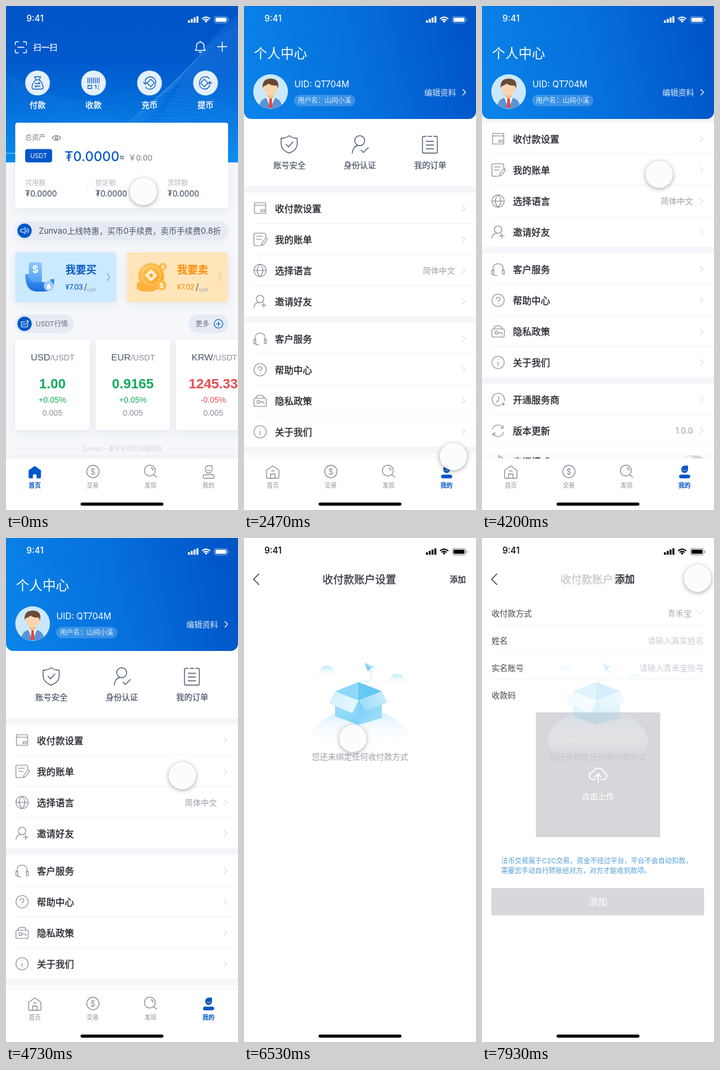
Recreate the animation shown at these times as an HTML page with a canvas. Size 375 by 812 pixels, loop 8000 ms.

```html
<!DOCTYPE html>
<html lang="zh-CN">
<head>
<meta charset="utf-8">
<title>钱包</title>
<style>
html, body { margin: 0; width: 100%; height: 100%; overflow: hidden; background: #fff; }
canvas { display: block; width: 375px; height: 812px; }
</style>
</head>
<body>
<canvas id="stage"></canvas>
<script>
const W = 375, H = 812, LOOP = 8000;
const dpr = window.devicePixelRatio || 1;
const CJK = '"Noto Sans CJK SC", "Noto Sans CJK", "Noto Sans CJK JP", sans-serif';
const UI = 'Inter, ' + CJK;
const ARIAL = '"Liberation Sans", sans-serif';
const BLUE = '#0057c8', SLATE = '#4a5568', GREY = '#8b909a', INK = '#24272e';

function context(canvas) {
  canvas.width = W * dpr;
  canvas.height = H * dpr;
  const c = canvas.getContext('2d');
  c.scale(dpr, dpr);
  c.lineCap = c.lineJoin = 'round';
  return c;
}
const main = context(document.getElementById('stage'));
const spare = context(document.createElement('canvas'));
let g = main;

// ---------- helpers ----------
const ease = p => p * p * (3 - 2 * p);
const phase = (t, from, to) => ease(Math.min(1, Math.max(0, (t - from) / (to - from))));
const mix = (a, b, p) => a + (b - a) * p;

function track(keys, t) {
  let i = 0;
  while (i < keys.length - 2 && t >= keys[i + 1][0]) i++;
  const [a, b] = [keys[i], keys[i + 1]];
  const p = phase(t, a[0], b[0]);
  return a.slice(1).map((v, k) => mix(v, b[k + 1], p));
}

// y is the visual centre of the line; bold adds a thin outline for medium weights
function text(s, x, y, size, color, { align = 'left', font = UI, weight = 400, bold = 0 } = {}) {
  g.font = `${weight} ${size}px ${font}`;
  g.textAlign = align;
  g.fillStyle = color;
  const base = y + size * 0.37;
  g.fillText(s, x, base);
  if (bold) {
    g.strokeStyle = color;
    g.lineWidth = bold;
    g.strokeText(s, x, base);
  }
}

// paths and their gradients are in coordinates local to (x, y)
function fill(d, color, x = 0, y = 0) {
  g.save();
  g.translate(x, y);
  g.fillStyle = color;
  g.fill(new Path2D(d));
  g.restore();
}

function line(d, color, width = 1.2, x = 0, y = 0) {
  g.save();
  g.translate(x, y);
  g.strokeStyle = color;
  g.lineWidth = width;
  g.stroke(new Path2D(d));
  g.restore();
}

function box(x, y, w, h, color, r = 0, shadow) {
  g.save();
  if (shadow) {
    g.shadowColor = shadow;
    g.shadowBlur = 14 * dpr;
    g.shadowOffsetY = 4 * dpr;
  }
  g.fillStyle = color;
  g.beginPath();
  g.roundRect(x, y, w, h, r);
  g.fill();
  g.restore();
}

function disc(x, y, r, color) {
  g.fillStyle = color;
  g.beginPath();
  g.arc(x, y, r, 0, 7);
  g.fill();
}

function ring(x, y, r, color, width = 1.2) {
  g.strokeStyle = color;
  g.lineWidth = width;
  g.beginPath();
  g.arc(x, y, r, 0, 7);
  g.stroke();
}

function grad(x0, y0, x1, y1, ...stops) {
  const k = g.createLinearGradient(x0, y0, x1, y1);
  stops.forEach((c, i) => k.addColorStop(i / (stops.length - 1), c));
  return k;
}

function layer(draw, alpha) {
  spare.clearRect(0, 0, W, H);
  g = spare;
  draw();
  g = main;
  g.save();
  g.globalAlpha = alpha;
  g.drawImage(spare.canvas, 0, 0, W, H);
  g.restore();
}

const chevron = (x, y, color, h = 4.5, w = h / 2, width = 1) =>
  line(`M${-w} ${-h}L${w} 0L${-w} ${h}`, color, width, x, y);

// ---------- shared chrome ----------
function status(color) {
  text('9:41', 33, 20, 14, color, { weight: 500 });
  for (let i = 0; i < 4; i++) {
    const h = 4 + i * 2.2;
    box(294 + i * 4.6, 27 - h, 3.2, h, color, 0.8);
  }
  g.strokeStyle = color;
  g.lineWidth = 2;
  g.lineCap = 'butt';
  for (const r of [5.6, 9]) {
    g.beginPath();
    g.arc(323.5, 27, r, -Math.PI * 0.76, -Math.PI * 0.24);
    g.stroke();
  }
  g.lineCap = 'round';
  fill('M0 0L-2.3-2.6A3.4 3.4 0 0 1 2.3-2.6Z', color, 323.5, 27);
  g.save();
  g.globalAlpha *= 0.45;
  g.strokeStyle = color;
  g.lineWidth = 1;
  g.beginPath();
  g.roundRect(336.8, 17, 21.4, 10.4, 2.8);
  g.stroke();
  box(359.4, 20.4, 1.4, 3.8, color, 0.7);
  g.restore();
  box(338.6, 18.8, 17.8, 6.8, color, 1.4);
}

const indicator = () => box(120.5, 800, 134, 5, '#000', 2.5);

function tabs(active) {
  box(0, 729, W, 83, '#fff', 0, 'rgba(40,60,100,.14)');
  ['首页', '交易', '发现', '我的'].forEach((s, i) => {
    const on = i === active;
    text(s, 46.5 + i * 93.6, 772, 9.7, on ? BLUE : GREY, { align: 'center', bold: on ? 0.4 : 0 });
  });
  const house = 'M0-10L10-3V8Q10 10 8 10H-8Q-10 10-10 8V-3Z';
  if (active === 0) {
    fill(house, BLUE, 46.5, 751);
    box(43.5, 754.5, 6, 6.7, '#fff', [2, 2, 0, 0]);
  } else line(house + 'M-3.5 10V3H3.5V10M-2-2H2', GREY, 1.4, 46.5, 751);
  ring(140.5, 750, 10, GREY, 1.4);
  text('$', 140.5, 750, 13, GREY, { align: 'center' });
  ring(232.5, 748.5, 8.8, GREY, 1.4);
  line('M6.5 6.5L11 10M2-5Q5-4 5-1', GREY, 1.4, 232.5, 749);
  const head = 'M0-10H5.5V-4A5.5 6 0 1 1 0-10Z';
  const body = 'M-5.5 4.5H5.5Q9 4.5 9 7.5Q9 10.5 5.5 10.5H-5.5Q-9 10.5-9 7.5Q-9 4.5-5.5 4.5Z';
  if (active === 3) {
    fill(head + body, BLUE, 327.5, 750.5);
    line('M-2.5-3Q0-1 2.5-3', '#f3b46c', 1.2, 327.5, 750.5);
  } else line(head + body + 'M-2.5-3Q0-1 2.5-3', GREY, 1.3, 327.5, 750.5);
  indicator();
}

// ---------- home ----------
function curves(count, color, y) {
  g.strokeStyle = color;
  for (let i = 0; i < count; i++) {
    g.beginPath();
    for (let x = 0; x <= W; x += 5) g.lineTo(x, y(x, i));
    g.stroke();
  }
}

function waves() {
  g.save();
  g.beginPath();
  g.rect(0, 0, W, 252);
  g.clip();
  // the lighter slope on the right
  fill('M150 252C270 225 260 100 375 15V252Z', grad(270, 60, 320, 250, 'rgba(60,160,255,.16)', 'rgba(60,160,255,.05)'));
  g.lineWidth = 0.6;
  curves(20, 'rgba(130,205,255,.2)', (x, i) =>
    mix(238, 15 + i * 4.5, 1 / (1 + Math.exp(-(x - 275 + i * 3) / 42))));
  curves(20, 'rgba(130,205,255,.16)', (x, i) =>
    110 + i * 4 + x * 0.17 + Math.sin(x / 60 - i * 0.08) * (24 - i * 1.6));
  g.restore();
}

const actionIcons = [
  'M-5-10H5L2.5-5H-2.5ZM-2.5-5C-8-1-12 10-6 10H6C12 10 8-1 2.5-5M-4 1H4L2-1M4 5H-4L-2 7',
  'M-9-8V0M-6-8V0M-3-8V0M0-8V0M3-8V0M6-8V0M9-8V0M-9 4H-3V9H-9ZM2 4H4V9M8 4V5M8 9V8',
  'M2-6L8 0L2 6L-4 0ZM-10-1L-7 2L-4-1M-7 1Q-8-9 1-10Q10-9 10 0Q9 10 0 10Q-4 10-6 7',
  'M-2-6L4 0L-2 6L-8 0ZM10 1L7-2L4 1M7-1Q8 9-1 10Q-10 9-10 0Q-9-10 0-10Q4-10 6-7'
];

function tradeCard(x, tint, color, arrow, title, price, art) {
  box(x, 397, 163.3, 80, tint, 4, 'rgba(40,70,120,.08)');
  art(x + 40, 437);
  text(title, x + 81, 425, 16.8, color, { weight: 700 });
  text(price, x + 81, 453, 11.3, color, { bold: 0.2 });
  text('/', x + 111, 453, 14, SLATE);
  text('USDT', x + 116, 457.5, 5.8, GREY);
  chevron(x + 150.5, 436.5, arrow, 6, 2);
}

function buyArt(x, y) {
  fill('M-18-21Q-18-24-15-24H0Q3-24 3-21V10H-18Z', grad(0, -24, 0, 10, '#8cc8ff', '#4d9bf5'), x, y);
  text('$', x - 7.5, y - 13, 16, '#fff', { align: 'center', weight: 700 });
  fill('M-24-5H-18V0Q-16 8-8 8H14Q17 8 17 3H23V9Q21 23 6 23H-6Q-24 22-24-5Z', grad(0, -5, 0, 23, '#4d9ef7', '#1a6ddd'), x, y);
  disc(x + 14, y + 14, 8, '#9accff');
  fill('M0-4Q7 5 0 5Q-7 5 0-4Z', '#fff', x + 14, y + 14);
}

function sellArt(x, y) {
  disc(x - 1, y - 2, 21, grad(x - 20, y - 20, x + 15, y + 20, '#ffc65c', '#ff9f1c'));
  fill('M-24 9Q-18 6-12 12H8Q14 13 12 18L2 23H-16L-24 19Z', '#ffb13d', x, y);
  ring(x - 1, y - 3, 15, 'rgba(255,255,255,.35)', 1.5);
  fill('M0-10L10 0L0 10L-10 0Z', '#fff3d9', x - 1, y - 3);
  fill('M0-4L4 0L0 4L-4 0Z', '#ffa726', x - 1, y - 3);
  for (const [dx, dy, r] of [[18, -17, 6], [16, 13, 8]]) {
    disc(x + dx, y + dy, r, '#ffb74a');
    text('$', x + dx, y + dy, r * 1.3, '#fff', { align: 'center', weight: 700 });
  }
}

function rateCard(x, coin, value, change, color) {
  const at = { align: 'center', font: ARIAL };
  box(x, 537, 120, 146, '#fff', 4, 'rgba(40,60,100,.08)');
  text(coin, x + 25, 565.7, 15, SLATE, { font: ARIAL });
  const w = g.measureText(coin).width;
  text('/USDT', x + 25 + w, 566, 13, GREY, { font: ARIAL });
  text(value, x + 60, 608.3, 22, color, { ...at, weight: 700 });
  text(change, x + 60, 634.6, 13, color, at);
  text('0.005', x + 60, 655.6, 13, GREY, at);
}

function home() {
  box(0, 0, W, H, '#f5f7fa');
  box(0, 0, W, 252, grad(0, 0, 0, 252, '#0055c6', '#0058cb', '#0370dd', '#068cf2'));
  waves();
  status('#fff');
  line('M-9-4V-7Q-9-9-7-9H-4M4-9H7Q9-9 9-7V-4M9 4V7Q9 9 7 9H4M-4 9H-7Q-9 9-9 7V4M-5 0H5', '#fff', 1.4, 24, 66.5);
  text('扫一扫', 44, 66.5, 13, '#fff', { bold: 0.25 });
  line('M-8 6Q-6 4-6-1Q-6-7 0-7Q6-7 6-1Q6 4 8 6ZM0-9V-7M-2 9H2', '#fff', 1.4, 314, 65.5);
  line('M-7.5 0H7.5M0-7.5V7.5', '#fff', 1.4, 349.5, 65.5);
  ['付款', '收款', '充币', '提币'].forEach((s, i) => {
    const x = 51 + i * 90.5;
    disc(x, 124, 20, '#e4f0fc');
    line(actionIcons[i], '#1a62bd', 1.3, x, 124);
    text(s, x, 159.5, 13, '#fff', { align: 'center', bold: 0.4 });
  });

  box(15, 188, 344, 138, '#fff', 4, 'rgba(40,60,100,.08)');
  text('总资产', 31, 212, 11, '#7b818c');
  line('M-7 0Q0-8 7 0Q0 8-7 0Z', '#5f6672', 1.1, 81.5, 212.5);
  ring(81.5, 212.5, 2, '#5f6672', 1.1);
  box(31, 230.5, 43.5, 21.5, BLUE, 4);
  text('USDT', 52.8, 241.5, 10, '#fff', { align: 'center' });
  text('₮0.0000', 94.5, 242, 21.5, '#0b5cc4', { weight: 500 });
  text('≈', 183, 243, 13, SLATE);
  text('￥0.00', 198, 244, 12.3, '#6d7480');
  [['可用额', 31], ['锁定额', 144.5], ['流转额', 261]].forEach(([s, x], i) => {
    text(s, x, 285, 11, '#b3b7be');
    text('₮0.0000', x, 302, 12.7, SLATE, { bold: 0.2 });
    if (i) box(i === 1 ? 130.5 : 243.5, 283, 1, 21, '#eceef2');
  });

  box(15, 347, 344, 30, '#e5eaf3', 15, 'rgba(40,60,100,.05)');
  disc(30, 362, 11.5, BLUE);
  line('M-6-2H-3L1-5V5L-3 2H-6ZM3-2Q5 0 3 2M5-4Q8 0 5 4', '#fff', 1, 30, 362);
  text('Zunvao上线特惠，买币0手续费，卖币手续费0.8折', 53, 362, 13, SLATE);

  tradeCard(15, '#cbe9ff', '#0b5cc4', '#3f83d8', '我要买', '¥7.03', buyArt);
  tradeCard(195.5, '#ffe5b9', '#ff8c0a', '#ffae4d', '我要卖', '¥7.02', sellArt);

  box(15, 497, 94.5, 30, '#e5eaf3', 15);
  disc(30, 512, 11.5, BLUE);
  line('M-5-3H1M5-1V5H-5V-3M-3 2L-1 0L1 2L5-4M3-5H6V-2', '#fff', 1, 30, 512);
  text('USDT行情', 48, 512, 11, '#69717f');
  box(295, 497, 64, 30, '#e5eaf3', 15);
  text('更多', 306.5, 512, 11, '#69717f');
  ring(343.5, 512, 7, BLUE, 1.1);
  line('M-3.5 0H3.5M0-3.5V3.5', BLUE, 1.1, 343.5, 512);

  rateCard(15, 'USD', '1.00', '+0.05%', '#12ab5c');
  rateCard(145, 'EUR', '0.9165', '+0.05%', '#12ab5c');
  rateCard(275, 'KRW', '1245.33', '-0.05%', '#ea4b4f');
  text('Zunvao--更安全的区块链钱包', 187.5, 713.5, 9.7, '#d3d6dc', { align: 'center' });
  box(15, 713, 99, 0.8, '#e6e9ee');
  box(260, 713, 99, 0.8, '#e6e9ee');
  tabs(0);
}

// ---------- profile ----------
const rowIcons = {
  card: 'M-9-9H9M-9-5H9V8H-9ZM-9-8V-5M9-8V-5M2 2H7V5H1Z',
  bill: 'M9-4V-8Q9-10 7-10H-8Q-10-10-10-8V8Q-10 10-8 10H0M-6-5H4M-6 0H2M10-3L3 6L2 10L6 8L12 0Z',
  globe: 'M-10 0A10 10 0 1 1 10 0A10 10 0 1 1-10 0M-10 0H10M0-10Q-9 0 0 10Q9 0 0-10',
  invite: 'M-6-4A6 6 0 1 1 6-4A6 6 0 1 1-6-4M-10 10Q-9 2-3 2M6 2V10M2 6H10',
  service: 'M-8 2V-1Q-8-9 0-9Q8-9 8-1V2M-10 1H-7V8H-10ZM7 1H10V8H7ZM-8 8Q-7 10-2 10',
  help: 'M-10 0A10 10 0 1 1 10 0A10 10 0 1 1-10 0M-3-2Q-3-5 0-5Q3-5 3-2Q3 0 0 1V2M0 5V5.3',
  privacy: 'M-8-4H8Q10-4 10-2V7Q10 9 8 9H-8Q-10 9-10 7V-2Q-10-4-8-4M-7-4Q-6-9 0-9Q6-9 7-4M-5 2A2.5 2.5 0 1 1 0 2A2.5 2.5 0 1 1-5 2M0 2H6V5',
  about: 'M-10 0A10 10 0 1 1 10 0A10 10 0 1 1-10 0M0-1V5M0-5V-4.7',
  clock: 'M4 9A10 10 0 1 1 10 2M1-5V1L-3 4M5 7H10M8 5L10 7L8 9',
  update: 'M-9-2A9 9 0 0 1 8-4M9 2A9 9 0 0 1-8 4M8-8V-4H4M-8 8V4H-4',
  night: 'M1-10Q13-4 8 6Q1 13-9 6Q4 6 1-10Z'
};

const groups = [
  [326, ['card', '收付款设置'], ['bill', '我的账单'], ['globe', '选择语言', '简体中文'], ['invite', '邀请好友']],
  [536, ['service', '客户服务'], ['help', '帮助中心'], ['privacy', '隐私政策'], ['about', '关于我们']],
  [746, ['clock', '开通服务商'], ['update', '版本更新', '1.0.0'], ['night', '夜间模式']]
];

function avatar() {
  g.save();
  g.beginPath();
  g.arc(43, 138, 28, 0, 7);
  g.clip();
  box(15, 110, 56, 56, '#cbe8fa');
  fill('M-19 30Q-19 13-7 10H7Q19 13 19 30Z', '#5b93d6', 43, 138);
  fill('M-7 9L0 28L7 9Z', '#fff', 43, 138);
  fill('M-2 11H2L3 26H-3Z', '#e0483e', 43, 138);
  box(38, 138, 10, 11, '#eabf96', 4);
  box(32, 118, 22, 26, '#f8d5ae', 11);
  fill('M-13-6Q-14-22 2-21Q15-20 12-5L10-10Q2-9-3-13Q-7-10-11-9Z', '#6a4a36', 43, 138);
  g.restore();
}

function rows(scroll) {
  g.save();
  g.translate(0, -scroll);
  line('M0-14Q5-10 13-10V0Q12 10 0 14Q-12 10-13 0V-10Q-5-10 0-14ZM-5 0L-1 4L6-4', '#4f5c70', 1.4, 73, 223);
  line('M-8-6A8 8 0 1 1 8-6A8 8 0 1 1-8-6M-12 14Q-11 4-4 2M2 9L6 13L14 5', '#4f5c70', 1.4, 187, 223);
  line('M-6-13H-10Q-12-13-12-11V12Q-12 14-10 14H10Q12 14 12 12V-11Q12-13 10-13H6M-3-13H3M-6-5H6M-6 1H6M-6 7H6', '#4f5c70', 1.4, 300.5, 223);
  ['账号安全', '身份认证', '我的订单'].forEach((s, i) =>
    text(s, 73.5 + i * 113.7, 256, 13, '#3f4c60', { align: 'center', bold: 0.2 }));
  for (const [top, ...items] of groups) {
    box(0, top - 36, W, 10.5, '#f4f6f9');
    items.forEach(([icon, label, note], i) => {
      const y = top + i * 50;
      line(rowIcons[icon], '#7d8490', 1.1, 26, y);
      text(label, 50, y, 15, INK, { bold: 0.35 });
      if (note) text(note, 341, y, 13, '#9a9fa8', { align: 'right' });
      if (icon === 'night') {
        box(325, y - 10, 34, 20, '#d9dadd', 10);
        disc(335, y, 9, '#fff');
      } else chevron(355, y, '#c5c9d1');
      if (i < items.length - 1) box(15, y + 24, 360, 0.8, '#eef0f3');
    });
  }
  box(0, 871, W, 120, '#f4f6f9');
  g.restore();
}

function profile(scroll) {
  box(0, 0, W, H, '#fff');
  rows(scroll);
  box(0, 0, W, 182, grad(0, 130, 360, 40, '#0a83e9', '#0670dc', '#0055c7'), [0, 0, 12, 12]);
  status('#fff');
  text('个人中心', 16, 76, 21.5, '#fff');
  avatar();
  text('UID: QT704M', 81.5, 126, 14, '#fff');
  box(81, 143, 99, 18.5, 'rgba(255,255,255,.2)', 9);
  text('用户名：山间小溪', 87, 152.5, 10.8, 'rgba(255,255,255,.85)');
  text('编辑资料', 291.5, 139, 12.8, 'rgba(255,255,255,.88)');
  chevron(356, 139, '#fff', 4.5, 2.2, 1.1);
  tabs(3);
}

// ---------- payment accounts ----------
function cloud(x, y) {
  fill('M-22 9Q-22 1-13 1Q-10-9 0-8Q9-8 11 0Q20 0 22 9Z', grad(0, -8, 0, 9, '#bde9fc', 'rgba(255,255,255,0)'), x, y);
}

function carton() {
  fill('M107 325C110 296 150 275 187 275C225 275 264 296 268 325Q268 350 246 352H129Q107 350 107 325Z',
    grad(0, 275, 0, 352, '#c9eefe', '#f1faff', '#fff', 'rgba(255,255,255,0)'));
  cloud(135, 214);
  cloud(248, 227);
  fill('M147 247L185 232V262Z', '#8fd8f8');
  fill('M185 232L223 247L185 262Z', '#66c8f4');
  fill('M147 247L185 262V301L147 287Z', grad(147, 250, 185, 300, '#a6e1fa', '#7ed2f7'));
  fill('M185 262L223 247V290L185 301Z', grad(185, 260, 223, 290, '#74cdf6', '#a0dffa'));
  fill('M147 247L185 262L175 282L137 266Z', grad(140, 250, 180, 280, '#d0effd', '#e8f8fe'));
  fill('M185 262L223 247L232 265L197 279Z', grad(190, 275, 232, 250, '#9bdcf9', '#cdeefc'));
  g.save();
  g.setLineDash([2, 3]);
  line('M205 214Q209 225 200 232Q190 228 187 233Q194 240 189 254', '#7dcdf3', 1);
  g.restore();
  fill('M195 201L212 208L205 210L200 215Z', '#b4e4fa');
  fill('M195 201L205 210L200 215Z', '#7fcdf4');
}

const back = () => line('M4-8.5L-4.5 0L4 8.5', '#333', 1.4, 20, 66.5);

function emptyBody() {
  text('收付款账户设置', 186.5, 66.5, 17, '#33363c', { align: 'center', bold: 0.3 });
  carton();
  text('您还未绑定任何收付款方式', 187.5, 352, 13, '#9a9ea6', { align: 'center' });
}

function addBody() {
  const right = { align: 'right' };
  ['收付款方式', '姓名', '实名账号', '收款码'].forEach((s, i) => {
    text(s, 15.5, 121 + i * 44, 13, '#1d2026', { bold: 0.2 });
    if (i < 3) box(15, 140 + i * 44, 344, 0.8, '#ebecef');
  });
  text('青禾宝', 339, 121, 13, '#8d929b', right);
  line('M-5-2.5L0 2.5L5-2.5', '#c0c4cb', 1, 352, 120);
  text('请输入真实姓名', 358.5, 165, 13, '#b5bac5', right);
  text('请输入青禾宝账号', 358.5, 209, 13, '#b5bac5', right);
  box(87, 281, 201, 201, '#c8c9ce');
  line('M-5 7H-8Q-14 7-14 1Q-14-5-8-5Q-6-11 1-11Q8-11 9-5Q14-4 14 1Q14 7 8 7H5M0 11V-2M-5 3L0-2L5 3', '#fff', 1.8, 187.5, 382);
  text('点击上传', 187.5, 416, 13, '#fff', { align: 'center', bold: 0.2 });
  text('法币交易属于C2C交易，资金不经过平台，平台不会自动扣款，', 31, 520, 11, '#0d78c8');
  text('需要您手动自行转账给对方，对方才能收到款项。', 31, 536, 11, '#0d78c8');
  box(15, 564, 344, 44, '#c8cace', 2);
  text('添加', 187.5, 586.5, 15, '#fff', { align: 'center' });
}

// the "添加" button travels into the title as p goes from list (0) to form (1)
function accountChrome(p) {
  status('#000');
  back();
  text('添加', mix(345.5, 187.5, p), 66.5, mix(13, 17, p), INK, { align: 'center', bold: 0.35 });
  indicator();
}

function emptyList() {
  box(0, 0, W, H, '#fff');
  emptyBody();
  accountChrome(0);
}

function addForm(p) {
  box(0, 0, W, H, '#fff');
  layer(addBody, p);
  layer(emptyBody, 1 - p);
  accountChrome(p);
}

// ---------- timeline ----------
const pointer = [
  [40, 222, 299], [1000, 348, 754], [2200, 348, 754], [2360, 347, 752], [2530, 335, 716],
  [2850, 296, 539], [2920, 296, 539], [3340, 288, 375], [3480, 288, 375], [3880, 287, 219],
  [3960, 287, 219], [4600, 285, 383], [4850, 285, 383], [5400, 176, 323],
  [7000, 176, 323], [7700, 348.5, 65]
];
const scrolling = [[2920, 0], [3340, 164], [3960, 164], [4600, 0]];

function touch(x, y) {
  g.save();
  g.shadowColor = 'rgba(0,0,0,.36)';
  g.shadowBlur = 7 * dpr;
  g.shadowOffsetY = 1.5 * dpr;
  disc(x, y, 22, 'rgba(255,255,255,.96)');
  g.restore();
}

function render(t) {
  g = main;
  const me = () => profile(track(scrolling, t)[0]);
  const toMe = phase(t, 1790, 2090), toList = phase(t, 5960, 6260), toForm = phase(t, 7800, 8000);
  if (toMe < 1) {
    home();
    if (toMe > 0) layer(me, toMe);
  } else if (toList < 1) {
    me();
    if (toList > 0) layer(emptyList, toList);
  } else if (toForm > 0) addForm(toForm);
  else emptyList();
  touch(...track(pointer, t));
}

const start = performance.now();
function tick() {
  render((performance.now() - start) % LOOP);
  requestAnimationFrame(tick);
}
tick();
</script>
</body>
</html>
```
